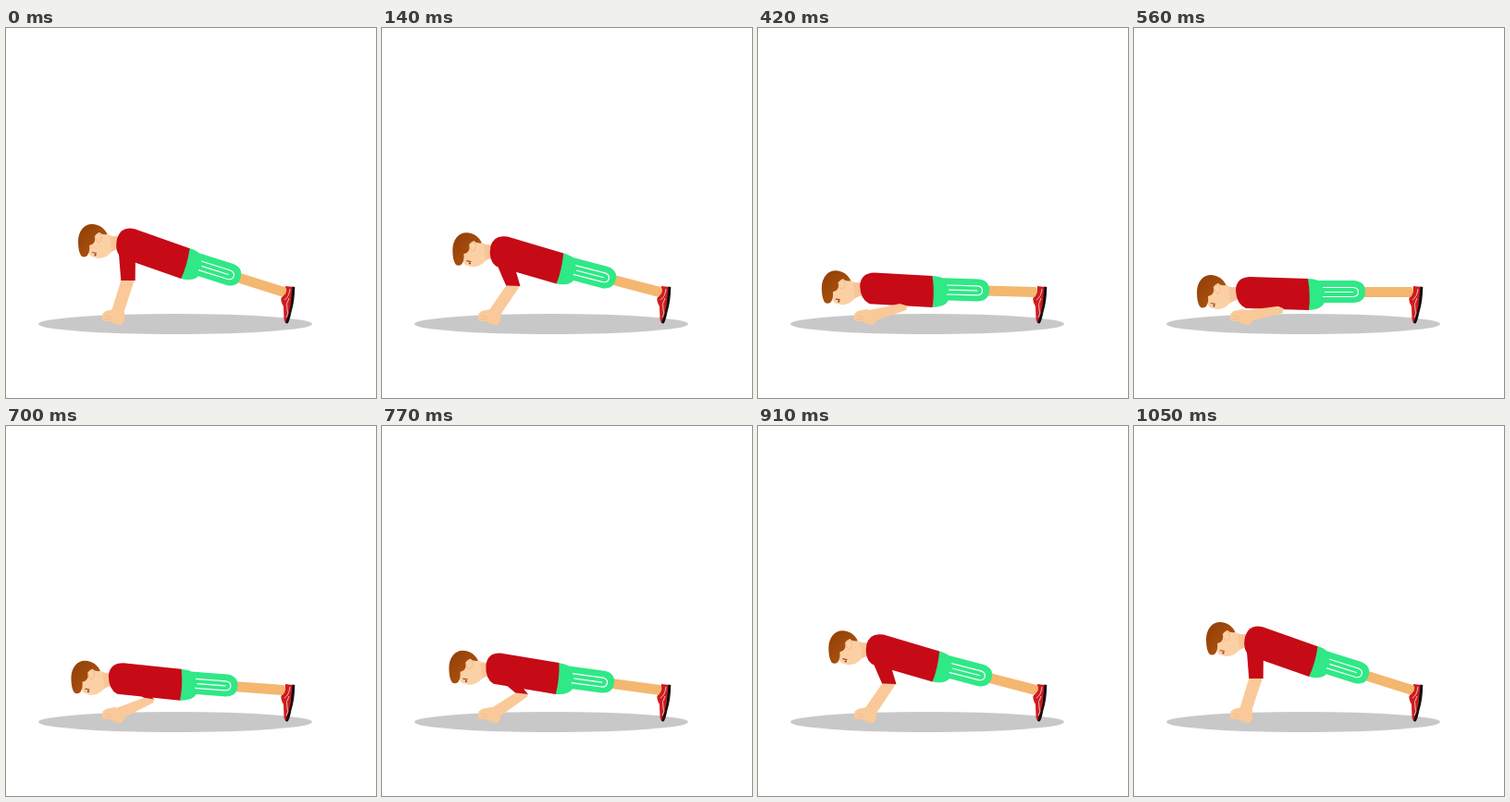
An HTML page that plays this animation: 400 by 400 pixels, repeating every 1570 ms.

```html
<!DOCTYPE html>
<html lang="en">
<head>
<meta charset="utf-8">
<title>Push-up</title>
<style>
html, body { margin: 0; width: 100%; height: 100%; overflow: hidden; background: #fff; }
svg { display: block; width: 100%; height: 100%; }
</style>
</head>
<body>
<svg viewBox="0 0 400 400">
  <defs>
    <linearGradient id="hair" x1="0" y1="0" x2="1" y2="1">
      <stop offset="0" stop-color="#8f3d05"/>
      <stop offset="1" stop-color="#b55a14"/>
    </linearGradient>
  </defs>
  <ellipse cx="183" cy="320" rx="148" ry="11" fill="#c8c8c8"/>

  <g id="shoe">
    <path d="M302 279L311 280L309 300L305 318Q301 320 300.5 314L300 301Q296 294 298 291Q302 289 302 279Z" fill="#cf1b20"/>
    <path d="M309.5 279.5L312.3 280Q312 296 308.500 307Q306.500 317 304.500 319.500L302 319Q306 309 307.500 300Z" fill="#111"/>
    <path d="M307 282Q306 291 301 294M306 292Q302 299 304 304T303 313" fill="none" stroke="#f0c9c4" stroke-width=".9"/>
  </g>

  <g id="head">
    <path d="M96 221L110 223Q116 226 122 225L126 238Q117 239 113 243Q108 249 99 249L92 247L88 242L89 229Z" fill="#fcd0a5"/>
    <path d="M112 226L122 225L126 238Q118 239 114 242Z" fill="#f8c598"/>
    <path d="M78 231C78 219 85 212 93 212C101 212 107 217 109.500 223Q104 224 101 221Q96 222 96 230Q95 234 90 235Q91 241 88 246Q84 249 81 246Q78 241 78 231Z" fill="url(#hair)"/>
    <path d="M96 225Q98 221 102 223Q105 227 101 232Q97 232 96 225Z" fill="#fcd0a5" stroke="#eab083" stroke-width=".7"/>
    <path d="M93 242.500L98 243.500" stroke="#9c4b17" stroke-width="1.2"/>
    <circle cx="96.500" cy="245.300" r="1.100" fill="#7b3a1c"/>
  </g>

  <g id="body">
    <path d="M245 280H300Q304 285 299 291H245Z" fill="#f3b76f"/>
    <path d="M187 271Q195 271 199 273H238Q250 274 250 285T238 297H206Q203 304 189 305Z" fill="#2fe886"/>
    <path d="M204 280.500H237Q242.500 281 242.500 285.500T237 290.500H204M206 285.500H237" fill="none" stroke="#fff" stroke-width="1.200"/>
    <path d="M188 271L125 269Q110 270 110 284Q111 299 121 303L189 305Q191 288 188 271Z" fill="#c60a16"/>
  </g>

  <path id="forearm" fill="#fac999"/>
  <path d="M117 304L108 306L104 309Q106 311 104 313Q102 316 106 317L113 317L119 320.500L125 321L128 317L128 307Z" fill="#fac999"/>
  <path d="M107 311L114 312M107 315L114 314" stroke="#efb685" stroke-width=".7"/>
  <path id="sleeve" fill="#c60a16"/>
</svg>
<script>
const LOOP = 1570, STEP = 70, STEPS = 15;
const ANKLE = [300, 289], SHOULDER = [120, 283], WRIST = [119, 312];
const UPPER = 44, LOWER = 41, TILT = 17.5;
const el = id => document.getElementById(id);
const quad = (...points) => 'M' + points.join('L') + 'Z';

function rotate([x, y], deg) {
  const a = deg * Math.PI / 180, dx = x - ANKLE[0], dy = y - ANKLE[1];
  return [ANKLE[0] + dx * Math.cos(a) - dy * Math.sin(a),
          ANKLE[1] + dx * Math.sin(a) + dy * Math.cos(a)];
}

// Two-bone reach from shoulder to the planted hand
function findElbow([sx, sy], bend) {
  const dx = WRIST[0] - sx, dy = WRIST[1] - sy, dist = Math.hypot(dx, dy);
  const along = (UPPER ** 2 - LOWER ** 2 + dist ** 2) / (2 * dist);
  const out = Math.sqrt(Math.max(0, UPPER ** 2 - along ** 2));
  return [sx + (dx * along + dy * out) / dist - bend,
          sy + (dy * along - dx * out) / dist];
}

function pose(depth) {
  const angle = TILT * (1 - depth);
  el('body').setAttribute('transform', `rotate(${angle} ${ANKLE})`);
  el('head').setAttribute('transform', `translate(${-10 * depth} ${55 * depth})`);

  const [sx, sy] = rotate(SHOULDER, angle);
  const [ex, ey] = findElbow([sx, sy], 10 * depth * (1 - depth));
  const half = 7.7 - 5 * depth ** 3;
  const fx = ex - WRIST[0], fy = ey - WRIST[1], len = Math.hypot(fx, fy);
  const nx = -fy / len * 6.5, ny = fx / len * 6.5;
  const cuff = [[ex - half, ey - 2.5 * depth], [ex + half, ey]];

  el('sleeve').setAttribute('d', quad([sx - 9, sy + 4], [sx + 10, sy], ...cuff.slice().reverse()));
  el('forearm').setAttribute('d', quad(
    [WRIST[0] - nx, WRIST[1] - ny], cuff[0], cuff[1],
    [ex + half - 1, ey + 5 * depth], [WRIST[0] + nx, WRIST[1] + ny]));
}

const lift = k => 1 - Math.cos(2 * Math.PI * k / STEPS);

function draw() {
  const step = Math.min(STEPS, Math.floor(performance.now() % LOOP / STEP));
  pose(lift(step) / lift(7));
  requestAnimationFrame(draw);
}
draw();
</script>
</body>
</html>
```
